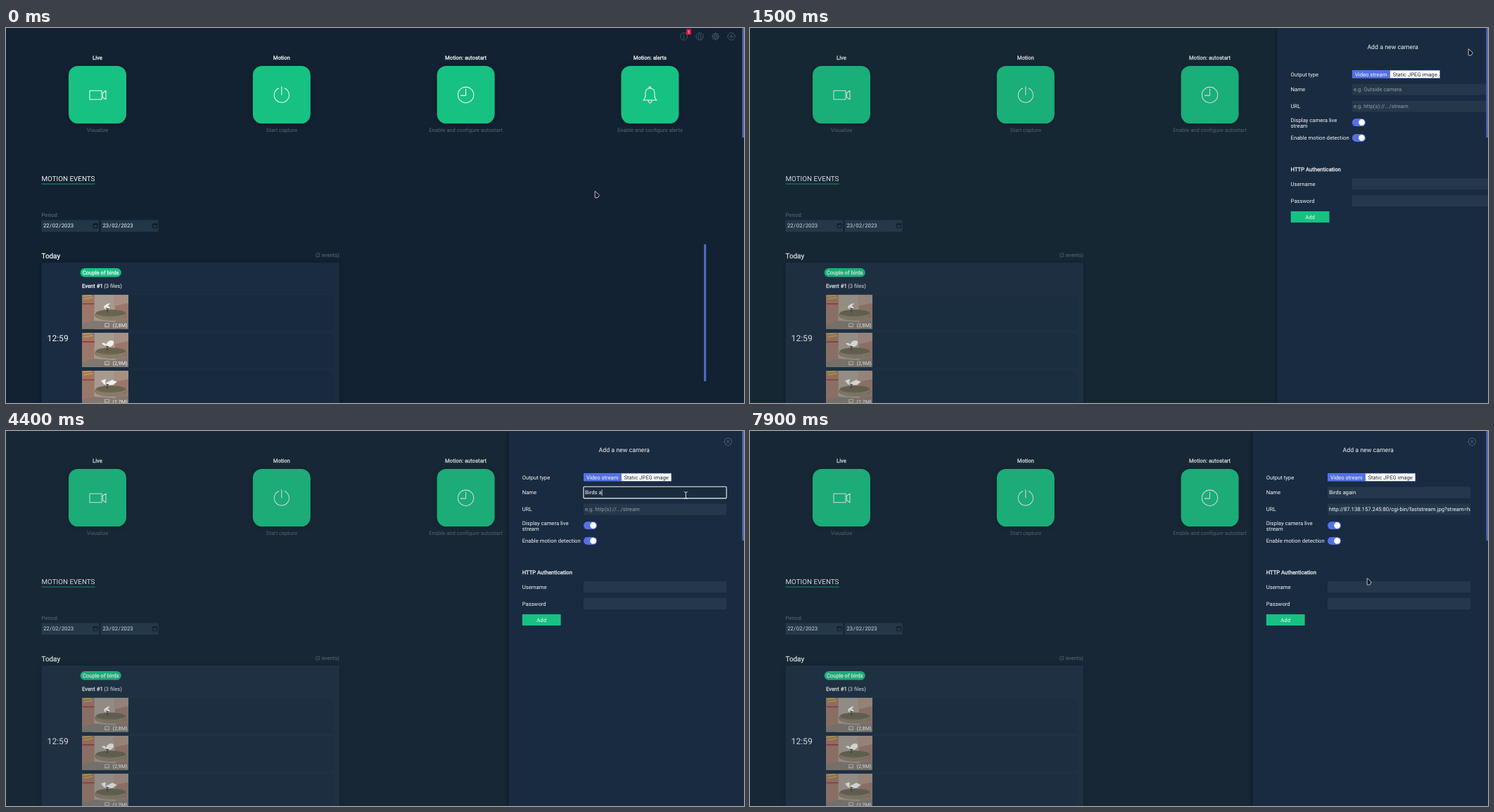
An HTML page for the animation above (8000 ms loop, 1049 px wide and 534 px high).

```html
<!DOCTYPE html>
<html lang="en">
<head>
<meta charset="utf-8">
<title>Add a new camera</title>
<style>
  html, body { margin: 0; width: 100%; height: 100%; overflow: hidden; background: #122232; }
  svg { display: block; }
  text { font-family: Roboto, sans-serif; white-space: pre; text-rendering: geometricPrecision; }
  .bold { stroke: currentColor; stroke-width: .28; }
  .line { fill: none; stroke-linecap: round; stroke-linejoin: round; }
  .card, .events { filter: drop-shadow(0 1px 3px rgba(0, 0, 0, .35)); }
  #panel { filter: drop-shadow(-1px 0 2px rgba(0, 0, 0, .35)); }
</style>
</head>
<body>
<svg id="stage" width="1049" height="534" viewBox="0 0 1049 534">
  <defs>
    <clipPath id="fieldClip"><rect x="821" y="79" width="203" height="42"/></clipPath>
    <clipPath id="thumbClip"><rect width="66" height="49"/></clipPath>
    <pattern id="bricks" width="6" height="4" patternUnits="userSpaceOnUse">
      <rect width="6" height="4" fill="#a27466"/>
      <path d="M0 .3H6M0 2.3H6M1 .3V2.3M4 2.3V4" stroke="#8b7a70" stroke-width=".6"/>
    </pattern>
  </defs>
  <g id="page"></g>
  <rect id="dim" width="1049" height="534" fill="#304046"/>
  <g id="panel"></g>
  <rect x="1046.5" width="2.5" height="156" fill="#5268b9"/>
  <g id="cursor">
    <path id="arrow" d="M.4 .4L6 5.2Q6.5 5.8 6 6.8L4.8 9.2L1.2 10Q.5 10 .4 9Z" fill="#10151c" stroke="#e8eaec" stroke-width=".8" stroke-linejoin="round"/>
    <path id="hand" d="M0 1Q0 0 .9 0T1.9 1V4.2L5 4.8Q6 5 5.9 6.2L5.3 10.3H.6L-2 6.6Q-2.3 5.6-1.2 5.7L0 6.6Z" fill="#10151c" stroke="#e8eaec" stroke-width=".8" stroke-linejoin="round"/>
    <path id="beam" class="line" d="M-2 -4.5Q0 -4.5 0 -3.5Q0 -4.5 2 -4.5M0 -3.5V4M-2 5Q0 5 0 4Q0 5 2 5" stroke="#f2f2f2" stroke-width=".9"/>
  </g>
</svg>
<script>
const LOOP = 8000, STEP = 100, BASE = 7.69;
const GREEN = '#17c182', BLUE = '#5571e3', WHITE = '#f4f6f7', GRAY = '#586571', FIELD = '#25384b';
const $ = id => document.getElementById(id);

// Text is placed by the middle of its capital letters.
function text(x, y, label, { size = BASE, fill = WHITE, anchor = 'start', bold, id, extra = '' } = {}) {
  return `<text x="${x}" y="${y + size * .355}" font-size="${size}" fill="${fill}" color="${fill}" text-anchor="${anchor}"` +
    `${bold ? ' class="bold"' : ''}${id ? ` id="${id}"` : ''} ${extra}>${label}</text>`;
}
const rect = (x, y, w, h, fill, rx = 0, extra = '') =>
  `<rect x="${x}" y="${y}" width="${w}" height="${h}" rx="${rx}" fill="${fill}" ${extra}/>`;
const line = (d, color, width = .9, extra = '') =>
  `<path class="line" d="${d}" stroke="${color}" stroke-width="${width}" ${extra}/>`;
const ring = (x, y, r) => `M${x - r} ${y}a${r} ${r} 0 1 0 ${2 * r} 0a${r} ${r} 0 1 0 ${-2 * r} 0`;

const cards = [
  ['Live', 'Visualize', 'M-11 -6H6V6.5H-11ZM7.5 -3L12 -6V6.5L7.5 3.5Z'],
  ['Motion', 'Start capture', 'M-4.2 -9.6A10.6 10.6 0 1 0 4.2 -9.6M0 -11.8V0'],
  ['Motion: autostart', 'Enable and configure autostart', ring(0, 0, 11.2) + 'M0 -8.5V.8H-7.3'],
  ['Motion: alerts', 'Enable and configure alerts',
    'M-9.5 7.5Q-6.5 5-6.5 1V-3Q-6.5 -9 0 -9.5Q6.5 -9 6.5 -3V1Q6.5 5 9.5 7.5ZM-2.5 8Q-2 11.5 0 11.5T2.5 8M-1.5 -9.5Q-1.5 -11.7 0 -11.7T1.5 -9.5'],
];

function card([title, note, icon], i) {
  const x = 130 + i * 261.8;
  return text(x, 42.5, title, { anchor: 'middle', bold: true }) +
    rect(x - 41, 54, 82, 82, GREEN, 13.2, 'class="card"') +
    line(icon, WHITE, 1.05, `transform="translate(${x} 95.3)"`) +
    text(x, 145.5, note, { anchor: 'middle', fill: GRAY });
}

function topIcons() {
  const teeth = Array.from({ length: 8 }, (_, i) => {
    const a = i * Math.PI / 4, p = r => `${1008.5 + r * Math.cos(a)} ${12 + r * Math.sin(a)}`;
    return `M${p(4)}L${p(5.3)}`;
  }).join('');
  const color = '#50606d';
  return line(ring(963.5, 12, 5.2) + 'M963.5 9V9.4M963.5 11V15', color, .8) +
    line(ring(986, 12, 5.2) + 'M984.3 16.5V13.5Q983.5 9 986 9T987.7 13.5V16.5', color, .8) +
    line(ring(1008.5, 12, 4) + ring(1008.5, 12, 1.9) + teeth, color, 1) +
    line(ring(1031, 12, 5.2) + 'M1028.3 12H1033.7M1031 9.3V14.7', color, .8, 'id="plus"') +
    rect(967, 1.5, 6.8, 8, '#f3163f', 1) + text(970.4, 5.6, '1', { size: 6, anchor: 'middle' });
}

function dateField(x, day) {
  return rect(x, 273.5, 81.5, 16, '#22364a') + rect(x, 289, 81.5, .7, '#2b4053') +
    text(x + 2.4, 281.7, `${day}<tspan dx=".55">/</tspan><tspan dx=".55">02</tspan><tspan dx=".55">/</tspan><tspan dx=".55">2023</tspan>`) +
    line(`M${x + 74} 279H${x + 79.5}V284.5H${x + 74}ZM${x + 74} 280H${x + 79.5}M${x + 75.2} 278.2V279M${x + 78.3} 278.2V279`, '#0a1119', .9);
}

const birds = [
  'M31 17Q34 13 40 12L37 16L40 19Q36 22 32 20Z',
  'M28 15Q33 13 34 17Q38 9 45 12Q46 18 40 20Q33 21 28 15Z',
  'M27 14L34 12L33 18L43 13L50 16L44 20Q35 22 31 19Z',
];

function eventRow(size, i) {
  const y = 379.5 + i * 54.1;
  return rect(108, y, 358, 51.5, '#182a3e', 1, 'stroke="#22354a" stroke-width=".6"') +
    `<g transform="translate(108 ${y + .3})" clip-path="url(#thumbClip)">` +
    rect(0, 0, 66, 49, 'url(#bricks)') +
    '<path d="M18 0H46L48 49H17Z" fill="#a69a90"/><path d="M46 0H66V12L47 16Z" fill="#a88f83"/>' +
    '<path d="M0 42L18 37L48 39L66 36V49H0Z" fill="#817871"/>' +
    '<ellipse cx="41" cy="29" rx="23" ry="8" fill="#7f7561"/><ellipse cx="41" cy="26" rx="21" ry="4.5" fill="#696350"/>' +
    line('M20 30Q40 38 62 29M23 33Q41 40 59 33', '#9a907d', .8) +
    `<path d="${birds[i]}" fill="#f0efec"/>` +
    line('M34 19L38 20M36 20V25', '#302e2b', 1) +
    line('M2 2L13 1M3 6L15 4', '#c6a23a', 1.5) + line('M4 9H15', '#b9713f', 1) + line('M1 13H17', '#a3343a', 1.6) +
    line('M33 41H38.5V46H33ZM34 44.8H36', '#eceae6', .6) +
    text(43.5, 44, `(${size})`, { size: 7.3 }) + '</g>';
}

$('page').innerHTML =
  rect(0, 0, 1049, 534, '#122232') + topIcons() + cards.map(card).join('') +
  text(50.5, 215, 'MOTION EVENTS', { size: 9.84 }) + rect(50.5, 221.6, 76, .9, '#17a873') +
  text(50.5, 266.5, 'Period:', { fill: '#64717c' }) + dateField(50.5, 22) + dateField(135, 23) +
  text(50.5, 324, 'Today', { size: 9.89, bold: true }) +
  text(474, 323.7, '(2 events)', { anchor: 'end', fill: '#64717c' }) +
  rect(50.5, 334, 423.5, 215, '#1a2c41', 2, 'class="events"') +
  rect(105.7, 342, 58, 12.6, GREEN, 6.3) + text(134.7, 348.2, 'Couple of birds', { anchor: 'middle', bold: true }) +
  text(108, 367.3, 'Event #1', { bold: true }) + text(139.2, 367.3, '(3 files)') +
  text(58.6, 442, '12:59', { size: 12.08 }) +
  ['2,8M', '2,9M', '1,7M'].map(eventRow).join('') +
  rect(992, 308, 3.2, 195, '#5268b9');

const field = y => rect(821, y - 8, 203, 16, FIELD);
const focusRing = (y, id) => rect(820.9, y - 8.3, 203.2, 16.6, '#1b2c3f', 1.3, `id="${id}" stroke="${WHITE}" stroke-width="1.1"`);
const toggle = y => rect(821, y - 5.5, 19, 11, BLUE, 5.5) + `<circle cx="834.6" cy="${y}" r="4.4" fill="#fff"/>`;
const label = (y, s, opts) => text(733.7, y, s, opts);

$('panel').innerHTML =
  rect(714.5, 0, 336, 534, '#192b41') +
  text(878.7, 27.3, 'Add a new camera', { size: 8.79, anchor: 'middle' }) +
  line(ring(1026.3, 15.3, 5.3) + 'M1024.3 13.3L1028.3 17.3M1028.3 13.3L1024.3 17.3', '#5d6b7a', .8) +
  label(65.8, 'Output type') + rect(821, 60, 54, 11.6, BLUE) +
  rect(874.8, 60.2, 71, 11.2, '#fff', 0, `stroke="${BLUE}" stroke-width=".5"`) +
  text(825, 65.8, 'Video stream') + text(878.5, 65.8, 'Static JPEG image', { fill: '#222b38' }) +
  label(87.7, 'Name') + label(111.7, 'URL') +
  label(131.2, 'Display camera live') + label(138.9, 'stream') + toggle(134.5) +
  label(156.4, 'Enable motion detection') + toggle(156.4) +
  label(201.3, 'HTTP Authentication', { bold: true }) +
  label(222.2, 'Username') + label(246.2, 'Password') +
  [87.6, 111.5, 222, 246].map(field).join('') +
  focusRing(87.6, 'nameRing') + focusRing(111.5, 'urlRing') +
  '<g clip-path="url(#fieldClip)">' +
  text(823, 87.7, '', { id: 'nameText' }) + text(823, 111.7, '', { id: 'urlText' }) + '</g>' +
  rect(0, 0, .7, 9, WHITE, 0, 'id="caret"') +
  rect(733.8, 261, 54.8, 16, GREEN, .6) + text(761.2, 269, 'Add', { anchor: 'middle' });

const NAME = 'Birds again', NAME_HINT = 'e.g. Outside camera';
const URL_VALUE = 'http://87.138.157.245:80/cgi-bin/faststream.jpg?stream=half', URL_HINT = 'e.g. http(s)://.../stream';
const keyTimes = [3200, 3400, 3500, 3700, 3900, 4200, 4400, 4700, 4900, 5000, 5200];

// Pointer path: time, x, y
const pointerPath = [
  [100, 836.8, 232], [300, 856, 212], [600, 975, 85], [800, 1040, 18], [1000, 1032, 9], [1100, 1031.6, 9.3],
  [1300, 1029, 16], [1500, 1020.8, 29.3], [1700, 990, 66], [1900, 966.3, 91.3],
  [6600, 966.3, 91.3], [6900, 950, 128], [7100, 937.2, 156], [7400, 937.2, 156],
  [7500, 936.6, 155.5], [7700, 936.6, 155.5], [7900, 876.8, 209.3],
];

function pointerAt(t) {
  const next = pointerPath.findIndex(k => k[0] > t);
  if (next === 0) return pointerPath[0].slice(1);
  if (next < 0) return pointerPath.at(-1).slice(1);
  const [t0, x0, y0] = pointerPath[next - 1], [t1, x1, y1] = pointerPath[next];
  const p = (t - t0) / (t1 - t0);
  return [x0 + (x1 - x0) * p, y0 + (y1 - y0) * p];
}

// CSS "ease" curve, solved by bisection
function ease(p) {
  if (p <= 0 || p >= 1) return Math.min(1, Math.max(0, p));
  const bezier = (s, a, b) => 3 * s * (1 - s) ** 2 * a + 3 * s * s * (1 - s) * b + s ** 3;
  let lo = 0, hi = 1;
  for (let i = 0; i < 24; i++) {
    const mid = (lo + hi) / 2;
    if (bezier(mid, .25, .25) < p) lo = mid; else hi = mid;
  }
  return bezier(lo, .1, 1);
}

const show = (id, on) => $(id).setAttribute('visibility', on ? 'visible' : 'hidden');
function setValue(id, value, hint) {
  $(id).textContent = value || hint;
  $(id).setAttribute('fill', value ? WHITE : '#909ba6');
}

function draw(t) {
  const opened = ease((t - 1130) / 600);
  $('dim').setAttribute('opacity', .17 * opened);
  $('panel').setAttribute('transform', `translate(${(1 - opened) * 336} 0)`);
  show('panel', opened > 0);
  $('plus').setAttribute('stroke', t >= 1000 && t < 1300 ? WHITE : '#50606d');

  const typed = NAME.slice(0, keyTimes.filter(k => k <= t).length);
  setValue('nameText', typed, NAME_HINT);
  setValue('urlText', t >= 6500 ? URL_VALUE : '', URL_HINT);

  const inName = t >= 2100 && t < 5600, inUrl = t >= 5600 && t < 7300;
  show('nameRing', inName);
  show('urlRing', inUrl);
  show('caret', inName && (t < 2700 || t >= 3200) || inUrl && t < 6200);
  $('caret').setAttribute('x', 823.1 + (inName && typed ? $('nameText').getComputedTextLength() : 0));
  $('caret').setAttribute('y', inName ? 83.2 : 107.2);

  const [x, y] = pointerAt(t);
  const hand = t >= 1000 && t < 1300;
  const beam = t >= 1900 && t < 7000 && y < 120;
  $('cursor').setAttribute('transform', `translate(${x} ${y})`);
  show('hand', hand);
  show('beam', beam);
  show('arrow', !hand && !beam);
}

const start = performance.now();
function tick() {
  const t = (performance.now() - start) % LOOP;
  draw(Math.floor(t / STEP) * STEP);
  requestAnimationFrame(tick);
}
tick();
</script>
</body>
</html>
```
